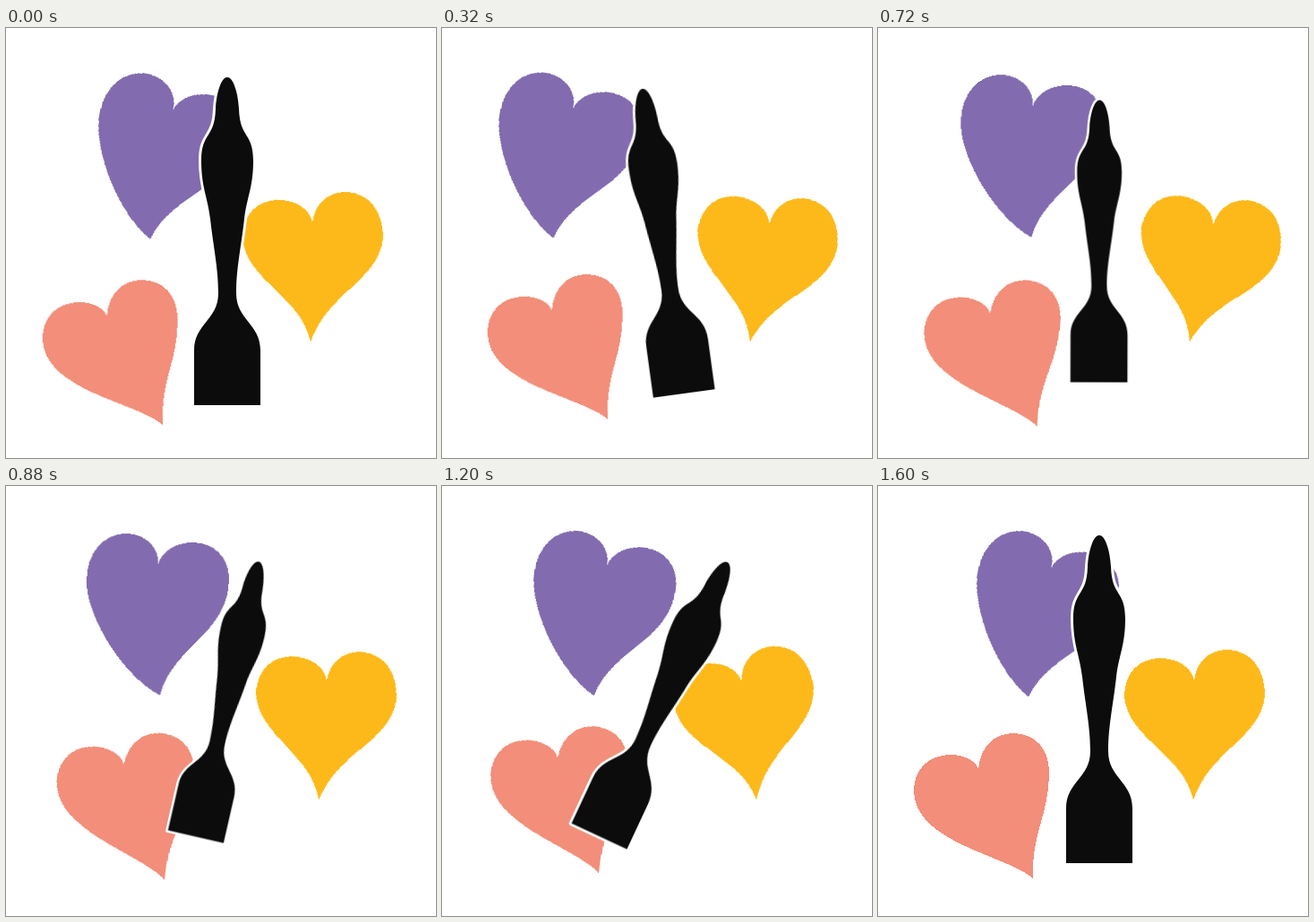
Recreate the animation shown at these times as an HTML page. Size 480 px wide and 480 px high, loop 1.68 s.

```html
<!DOCTYPE html>
<html lang="en">
<head>
<meta charset="utf-8">
<title>Trophy and hearts</title>
<style>
  html, body { margin: 0; width: 100%; height: 100%; overflow: hidden; background: #fff; }
  svg { display: block; width: 100vw; height: 100vh; }
  path { transform-origin: 0 0; }
  .heart { shape-rendering: crispEdges; }
  #purple { fill: #826baf; }
  #yellow { fill: #fdb919; }
  #pink { fill: #f28e79; }
  #trophy { fill: #0c0c0c; stroke: #fff; stroke-width: 6; stroke-linejoin: round; paint-order: stroke; }
</style>
</head>
<body>
<svg viewBox="0 0 480 480">
  <!-- hearts: the point sits at 0,0 -->
  <path id="purple" class="heart" d="M0 0C-38 -20 -80 -85 -80 -128C-80 -160 -60 -181 -36 -181C-14 -181 2 -165 0 -146C4 -160 20 -170 39 -170C62 -170 79 -153 79 -130C79 -68 16 -56 0 0Z"/>
  <path id="yellow" class="heart" d="M0 0C-12 -52 -72 -66 -78 -115C-78 -142 -61 -158 -38 -158C-18 -158 -3 -148 0 -133C2 -154 16 -168 37 -168C62 -168 79 -147 79 -118C76 -70 18 -56 0 0Z"/>
  <path id="pink" class="heart" d="M0 0C-30 -26 -133 -40 -133 -98C-133 -122 -116 -138 -92 -138C-78 -138 -64 -132 -61 -122C-59 -146 -44 -162 -22 -162C4 -162 18 -143 18 -118C18 -70 -2 -52 0 0Z"/>
  <path id="trophy" d="M0 -183C7 -183 12 -165 13 -148C14 -114 29 -122 29 -90C29 -60 22 -50 19 -25C15 10 10 30 10 58C10 88 37 92 37 122V183H-37V122C-37 92 -10 88 -10 58C-10 30 -15 10 -19 -25C-22 -50 -29 -60 -29 -90C-29 -122 -14 -114 -13 -148C-12 -165 -7 -183 0 -183Z"/>
</svg>
<script>
const STEPS = 21, STEP_MS = 80;

// Swing between turning points [step, value], easing in and out of each
function swing(n, ...turns) {
  const next = turns.findIndex(([step]) => step > n);
  if (next === 0) return turns[0][1];
  if (next < 0) return turns.at(-1)[1];
  const [[from, a], [to, b]] = turns.slice(next - 1, next + 1);
  const u = (n - from) / (to - from);
  return a + (b - a) * u * u * (3 - 2 * u);
}

const poses = {
  purple: n => ({
    x: swing(n, [0, 161], [3, 121], [9.5, 172], [19, 168]),
    y: 235.5 - 2 * Math.sin(Math.PI * n / STEPS),
    tilt: swing(n, [2, 10], [11, -0.8], [18, 10])
  }),
  yellow: n => ({
    x: 340 + 12 * Math.sin(Math.PI * n / 40),
    y: 350.5,
    tilt: swing(n, [0, 0.9], [7, 14.8], [15, -7.2], [20, 0.4])
  }),
  pink: n => ({
    x: swing(n, [0, 175], [4, 185], [10, 177], [20, 173]),
    y: swing(n, [0, 443], [3.5, 436], [7, 447], [15, 432], [19, 438]),
    tilt: swing(n, [5, -0.7], [13, 8.5], [20, 0])
  }),
  trophy: n => ({
    x: 247,
    y: 238,
    tilt: swing(n, [0, 0], [6, -10.5], [14.4, 26], [19.6, 0]),
    size: 1 - 0.0155 * Math.min(n, 20 - n)
  })
};

function play(id, pose) {
  const frames = Array.from({ length: STEPS + 1 }, (_, i) => {
    const { x, y, tilt, size = 1 } = pose(i % STEPS);
    return {
      transform: `translate(${x}px, ${y}px) rotate(${tilt}deg) scale(${size})`,
      offset: i / STEPS,
      easing: 'step-end'
    };
  });
  document.getElementById(id).animate(frames, { duration: STEPS * STEP_MS, iterations: Infinity });
}

for (const id in poses) play(id, poses[id]);
</script>
</body>
</html>
```
